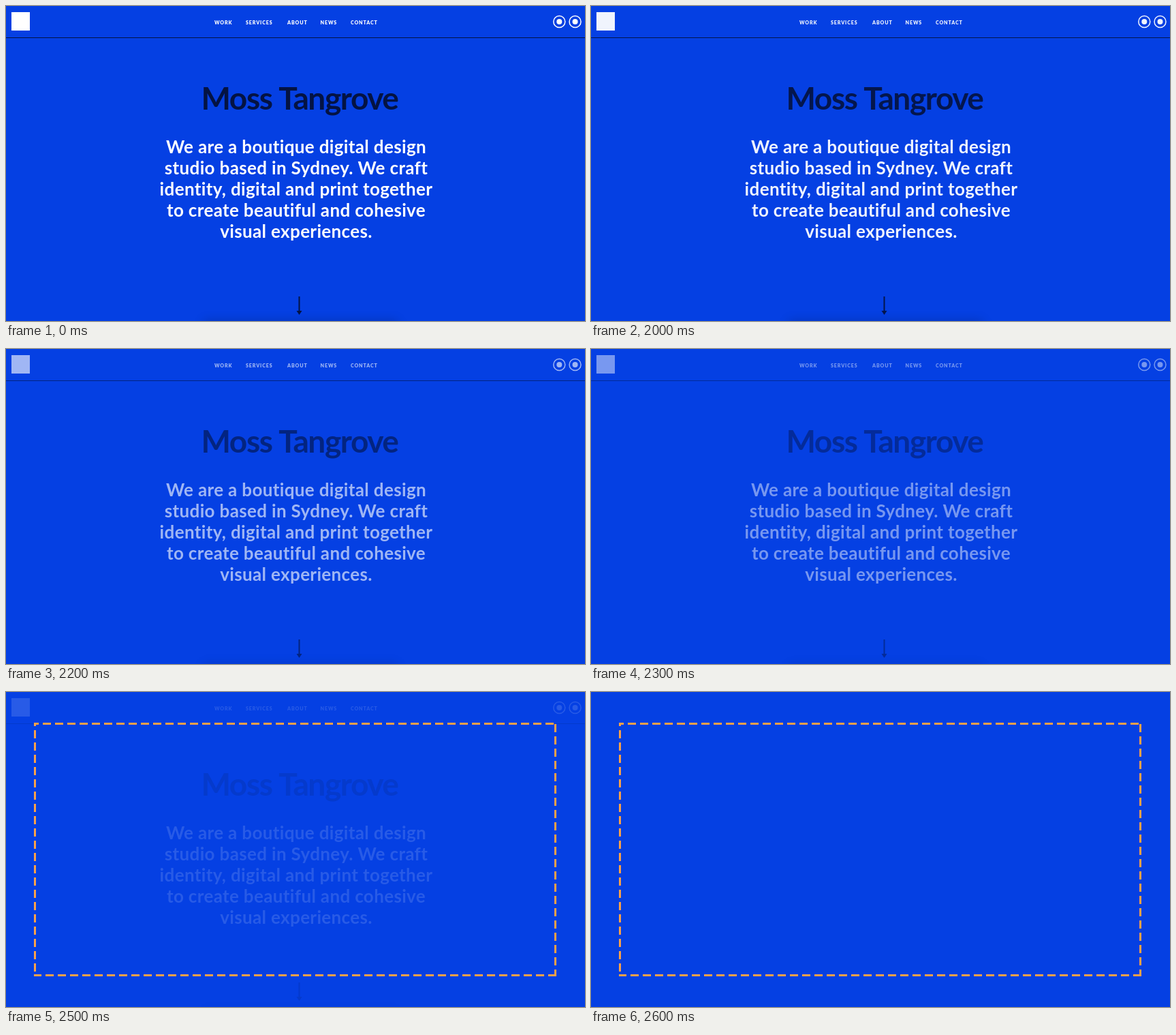
These frames come from a looping animation (850x462 px, 5.6 s). An HTML page with a canvas:

```html
<!DOCTYPE html>
<html lang="en">
<head>
<meta charset="utf-8">
<title>Studio page fade</title>
<style>
  html, body { margin: 0; width: 100%; height: 100%; overflow: hidden; background: #0540e3; }
  canvas { display: block; width: 850px; height: 462px; }
</style>
</head>
<body>
<canvas id="stage"></canvas>
<script>
const W = 850, H = 462, LOOP = 5600;
const FADE_START = 2000, FADE_END = 2600, BOX_START = 2400, STEP = 100;
const BLUE = '#0540e3', NAVY = '#041343', WHITE = '#fff', ORANGE = '#f9a149';

const nav = [['WORK', 306], ['SERVICES', 352], ['ABOUT', 413], ['NEWS', 461.5], ['CONTACT', 506]];
const intro = [
  'We are a boutique digital design',
  'studio based in Sydney. We craft',
  'identity, digital and print together',
  'to create beautiful and cohesive',
  'visual experiences.'
];

const canvas = document.getElementById('stage');
const ctx = canvas.getContext('2d');
const ratio = window.devicePixelRatio || 1;
canvas.width = W * ratio;
canvas.height = H * ratio;
ctx.scale(ratio, ratio);

function write(text, x, y, font, color, align, spacing) {
  ctx.font = `${font} Lato, sans-serif`;
  ctx.letterSpacing = spacing + 'px';
  ctx.textAlign = align;
  ctx.fillStyle = color;
  ctx.fillText(text, x, y);
}

function rect(x, y, w, h, color) {
  ctx.fillStyle = color;
  ctx.fillRect(x, y, w, h);
}

function badge(x, y) {
  ctx.strokeStyle = ctx.fillStyle = WHITE;
  ctx.lineWidth = 1.5;
  ctx.beginPath();
  ctx.arc(x, y, 8.5, 0, Math.PI * 2);
  ctx.stroke();
  ctx.beginPath();
  ctx.arc(x, y, 4, 0, Math.PI * 2);
  ctx.fill();
}

function arrow() {
  rect(429.5, 426, 2, 21, NAVY);
  ctx.beginPath();
  ctx.moveTo(426.5, 447);
  ctx.lineTo(434.5, 447);
  ctx.lineTo(430.5, 453);
  ctx.fill();
}

// Soft shadow cast upwards by a panel just below the stage.
function panelShadow() {
  ctx.shadowColor = 'rgba(0, 0, 0, 0.2)';
  ctx.shadowBlur = 16 * ratio;
  rect(290, H, 285, 40, NAVY);
  ctx.shadowColor = 'transparent';
}

function page(alpha) {
  ctx.globalAlpha = alpha;
  panelShadow();
  rect(8, 9, 27, 27, WHITE);
  nav.forEach(([label, x]) => write(label, x, 26.5, '900 7.1px', WHITE, 'left', 0.9));
  badge(812.3, 23);
  badge(835.5, 23);
  rect(0, 46, W, 1, NAVY);
  write('Moss Tangrove', 431, 151.5, '700 46px', NAVY, 'center', -1.4);
  intro.forEach((line, i) => write(line, 426, 216 + i * 31, '700 26px', WHITE, 'center', 0.35));
  arrow();
  ctx.globalAlpha = 1;
}

// Straight dashed edge; lead is the distance to the first full dash.
function edge(x1, y1, x2, y2, lead) {
  ctx.lineDashOffset = -lead;
  ctx.beginPath();
  ctx.moveTo(x1, y1);
  ctx.lineTo(x2, y2);
  ctx.stroke();
}

function dashedBox() {
  ctx.strokeStyle = ORANGE;
  ctx.lineWidth = 3;
  ctx.setLineDash([12, 6]);
  edge(41, 46.5, 805, 46.5, 13);
  edge(806.5, 47, 806.5, 417, 0);
  edge(41, 415.5, 808, 415.5, 17);
  edge(42.5, 45, 42.5, 417, 11);
  ctx.setLineDash([]);
}

function pageAlpha(t) {
  if (t < FADE_START) return 1;
  if (t >= FADE_END) return 0;
  return 0.94 - 0.16 * Math.floor((t - FADE_START) / STEP);
}

function draw(t) {
  rect(0, 0, W, H, BLUE);
  const alpha = pageAlpha(t);
  if (alpha > 0) page(alpha);
  if (t >= BOX_START) dashedBox();
}

const start = performance.now();
function tick() {
  draw((performance.now() - start) % LOOP);
  requestAnimationFrame(tick);
}
tick();
</script>
</body>
</html>
```
